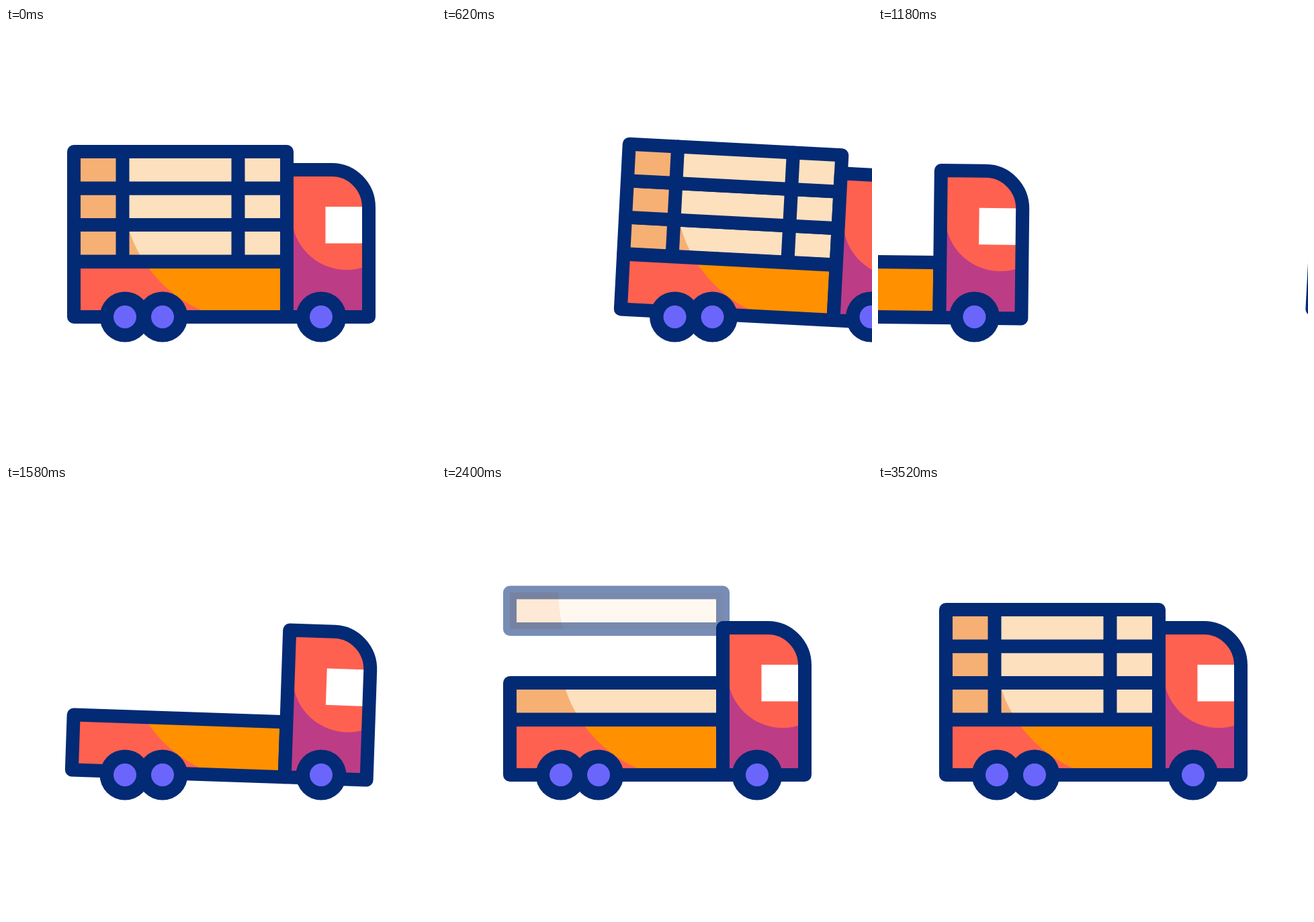
Write an HTML page with a canvas that moves like this. It is 640x640 px and loops after 3.6 s.

```html
<!DOCTYPE html>
<html lang="en">
<head>
<meta charset="utf-8">
<title>Truck</title>
<style>
  html, body { margin: 0; height: 100%; overflow: hidden; background: #fff; }
  canvas { display: block; width: 100vmin; height: 100vmin; }
</style>
</head>
<body>
<canvas width="640" height="640"></canvas>
<script>
const ctx = document.querySelector('canvas').getContext('2d');
const LOOP = 3600;
const NAVY = '#032a74', CORAL = '#ff6150', ORANGE = '#ff9100', CREAM = '#fde0be',
      TAN = '#f7b074', PURPLE = '#bd3c86', VIOLET = '#6b66fb';

const clamp = v => Math.min(1, Math.max(0, v));
const smooth = u => u * u * (3 - 2 * u);
const arch = u => Math.sin(Math.PI * clamp(u));

// Eased value between [time, value] keys.
function track(t, keys) {
  let [t0, v0] = keys[0];
  for (const [t1, v1] of keys) {
    if (t < t1) return v0 + (v1 - v0) * smooth(clamp((t - t0) / (t1 - t0)));
    [t0, v0] = [t1, v1];
  }
  return v0;
}

// Slats, bottom to top: final top line, drop height, start time.
const SLATS = [[293, 244, 1944], [238.5, 147, 2188], [184, 93, 2432]];
const FADE = 400, FALL = 285;
const POSTS = [[173.5, 2600], [345.5, 2960]];

function slatState([, drop, start], t) {
  const age = t - start;
  return {
    dy: -drop * (1 - clamp(age / FALL) ** 2.7) - 11 * arch((age - FALL - 10) / 140),
    alpha: clamp(age / FADE),
    dip: 2.5 * arch((age - FALL + 60) / 200)
  };
}

function disc(x, y, r, color) {
  ctx.fillStyle = color;
  ctx.beginPath();
  ctx.arc(x, y, r, 0, 7);
  ctx.fill();
}

// The big curve that separates shade from light on bed and slats.
const CURVE = [370.5, 240, 197];

const cab = new Path2D('M418 211H485C515 211 540 236 540 267V430H418Z');
const bed = new Path2D('M101 348H418V430H101Z');

function drawBody() {
  ctx.save();
  ctx.clip(bed);
  ctx.fillStyle = CORAL;
  ctx.fill(bed);
  disc(...CURVE, ORANGE);
  ctx.restore();
  ctx.stroke(bed);

  ctx.save();
  ctx.clip(cab);
  ctx.fillStyle = PURPLE;
  ctx.fill(cab);
  disc(507, 278, 82, CORAL);
  ctx.fillRect(418, 211, 122, 67);
  ctx.restore();
  ctx.fillStyle = '#fff';
  ctx.fillRect(475.5, 266, 60, 54.5);
  ctx.stroke(cab);
}

function drawSlat(y, { dy, alpha }) {
  if (!alpha) return;
  const frame = new Path2D(), shade = new Path2D();
  frame.rect(101, y, 317, 54.5);
  shade.rect(101, y, 200, 54.5);
  shade.arc(...CURVE, 0, 7);
  ctx.save();
  ctx.translate(0, dy);
  ctx.globalAlpha = alpha ** 2.4;
  ctx.fillStyle = CREAM;
  ctx.fill(frame);
  ctx.save();
  ctx.beginPath();
  ctx.rect(101, y, 120, 54.5);
  ctx.clip();
  // Keep only the part of the slat left of the curve.
  const outside = new Path2D('M0 0H640V640H0Z');
  outside.moveTo(CURVE[0] + CURVE[2], CURVE[1]);
  outside.arc(...CURVE, 0, 2 * Math.PI);
  ctx.fillStyle = TAN;
  ctx.fill(outside, 'evenodd');
  ctx.restore();
  ctx.globalAlpha = alpha;
  ctx.stroke(frame);
  ctx.restore();
}

function drawPost(x, start, t) {
  const u = clamp((t - start) / 560);
  if (!u) return;
  ctx.beginPath();
  ctx.moveTo(x, 184);
  ctx.lineTo(x, 184 + 164 * u * (2 - u));
  ctx.stroke();
}

// `load` is the time used for the cargo frame being built.
function drawTruck(x, tilt, load) {
  const states = SLATS.map(s => slatState(s, load));
  ctx.save();
  ctx.translate(x, 0);
  ctx.save();
  ctx.translate(320, 335);
  ctx.rotate(tilt * Math.PI / 180);
  ctx.translate(-320, -335);
  states.forEach((s, i) => drawSlat(SLATS[i][0], s));
  ctx.save();
  ctx.translate(0, Math.max(...states.map(s => s.dip)));
  drawBody();
  ctx.restore();
  for (const [px, start] of POSTS) drawPost(px, start, load);
  ctx.restore();
  const wheels = [177, 233, 469];
  for (const w of wheels) disc(w, 430, 37.5, NAVY);
  for (const w of wheels) disc(w, 430, 17, VIOLET);
  ctx.restore();
}

function draw(t) {
  ctx.fillStyle = '#fff';
  ctx.fillRect(0, 0, 640, 640);
  ctx.strokeStyle = NAVY;
  ctx.lineWidth = 20;
  ctx.lineJoin = ctx.lineCap = 'round';
  if (t < 1300) {
    drawTruck(track(t, [[0, 0], [225, -23], [1252, 558]]),
              track(t, [[0, 0], [420, 3]]), LOOP);
  }
  if (t > 880) {
    drawTruck(track(t, [[886, -562], [1546, 0]]),
              track(t, [[960, 0], [1560, 2.1], [1780, -3], [2000, 0]]), t);
  }
}

function tick() {
  draw(performance.now() % LOOP);
  requestAnimationFrame(tick);
}
tick();
</script>
</body>
</html>
```
